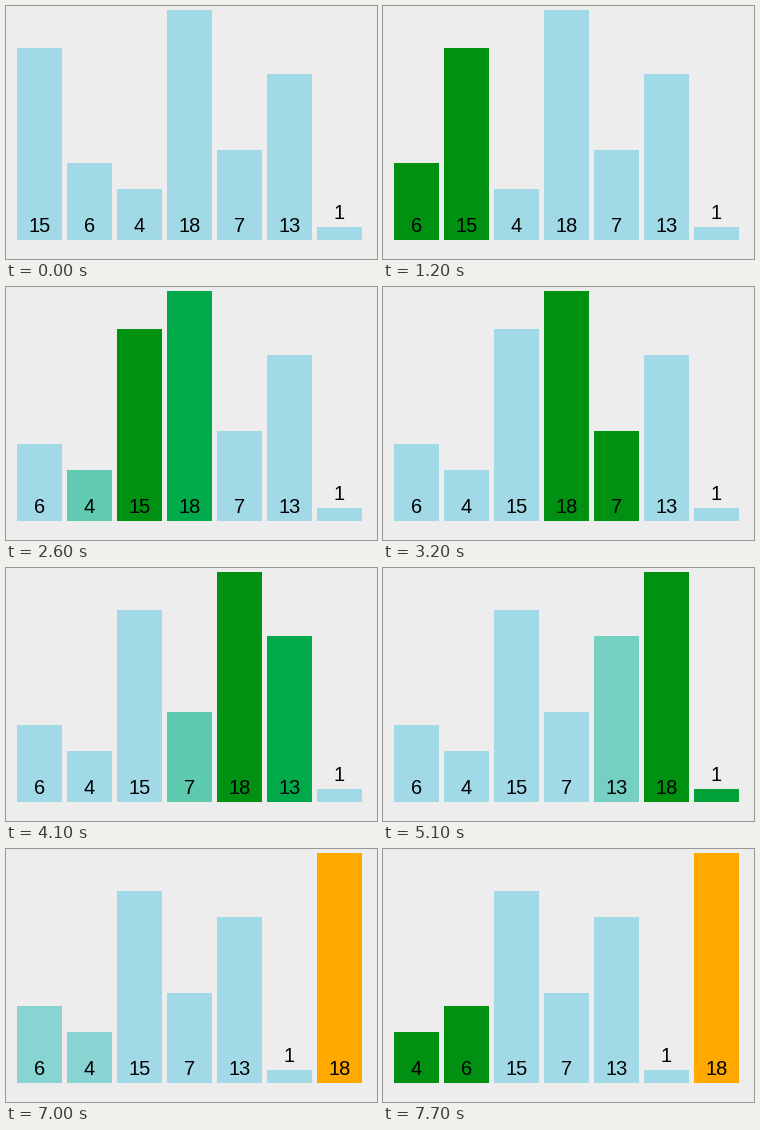
Animation of 371x253 px, one loop 8000 ms. Source, as a matplotlib script:

```python
import matplotlib.pyplot as plt
import numpy as np
from matplotlib.animation import FuncAnimation
from matplotlib.patches import Rectangle

W, H, DPI = 371, 253, 100
STEP, FRAMES = 100, 80
LEFT, PITCH, BAR_W, FLOOR, UNIT = 11, 50, 45, 234, 12.8
VALUES = [15, 6, 4, 18, 7, 13, 1]

# Red may be negative: the green lies outside the gamut and is clipped on display.
BLUE = (161, 217, 231)
GREEN = (-90, 144, 18)
ORANGE = (255, 169, 0)
GAMMA = np.array([1, 3, 1])

# (start ms, end ms, change): an int swaps that slot with the next one,
# a dict fades slots to new colours.
EVENTS = [
    (480, 680, {0: GREEN, 1: GREEN}),
    (880, 1180, 0),
    (1380, 1680, {0: BLUE, 2: GREEN}),
    (1980, 2180, 1),
    (2378, 2678, {1: BLUE, 3: GREEN}),
    (2980, 3180, {2: BLUE, 4: GREEN}),
    (3440, 3600, 3),
    (3880, 4180, {3: BLUE, 5: GREEN}),
    (4440, 4600, 4),
    (4853, 5153, {4: BLUE, 6: GREEN}),
    (5480, 5680, 5),
    (5983, 6183, {5: BLUE, 6: ORANGE}),
    (6980, 7180, {0: GREEN, 1: GREEN}),
    (7480, 7680, 0),
]


def mix(a, b, p):
    if p >= 1:
        return b
    a, b = np.array(a, float), np.array(b, float)
    m = a ** GAMMA * (1 - p) + b ** GAMMA * p
    return np.sign(m) * np.abs(m) ** (1 / GAMMA)


def state(ms):
    """Slot order, slot position and colour of every bar at a time."""
    order = list(range(len(VALUES)))
    pos = [float(i) for i in order]
    color = [BLUE for _ in order]
    for start, end, change in EVENTS:
        p = min((ms - start) / (end - start), 1)
        if p <= 0:
            break
        if isinstance(change, dict):
            for slot, target in change.items():
                bar = order[slot]
                color[bar] = mix(color[bar], target, p)
        else:
            a, b = order[change:change + 2]
            pos[a], pos[b] = change + p, change + 1 - p
            if p >= 1:
                order[change:change + 2] = b, a
    return order, pos, color


# The small extra guards against rounding down to a pixel less.
fig = plt.figure(figsize=((W + 0.01) / DPI, (H + 0.01) / DPI), dpi=DPI,
                 facecolor="#ededed")
ax = fig.add_axes([0, 0, 1, 1])
ax.set_xlim(0, W)
ax.set_ylim(H, 0)
ax.axis("off")

bars, labels = [], []
for v in VALUES:
    h = v * UNIT
    bars.append(ax.add_patch(Rectangle((0, FLOOR - h), BAR_W, h, linewidth=0)))
    base = FLOOR - 8 - (13 if v == 1 else 0)
    labels.append(ax.text(0, base, str(v), ha="center", va="baseline",
                          family="Liberation Sans", fontsize=20 * 72 / DPI,
                          color="black"))


def draw(frame):
    order, pos, color = state(frame * STEP)
    for slot, i in enumerate(order):
        x = LEFT + PITCH * pos[i]
        bars[i].set_x(x)
        bars[i].set_facecolor(np.clip(np.array(color[i]) / 255, 0, 1))
        bars[i].set_zorder(2 * slot + 1)
        labels[i].set_x(x + BAR_W / 2)
        labels[i].set_zorder(2 * slot + 2)
    return bars + labels


anim = FuncAnimation(fig, draw, frames=FRAMES, interval=STEP,
                     repeat=True, repeat_delay=0, blit=False)
plt.show()
```
